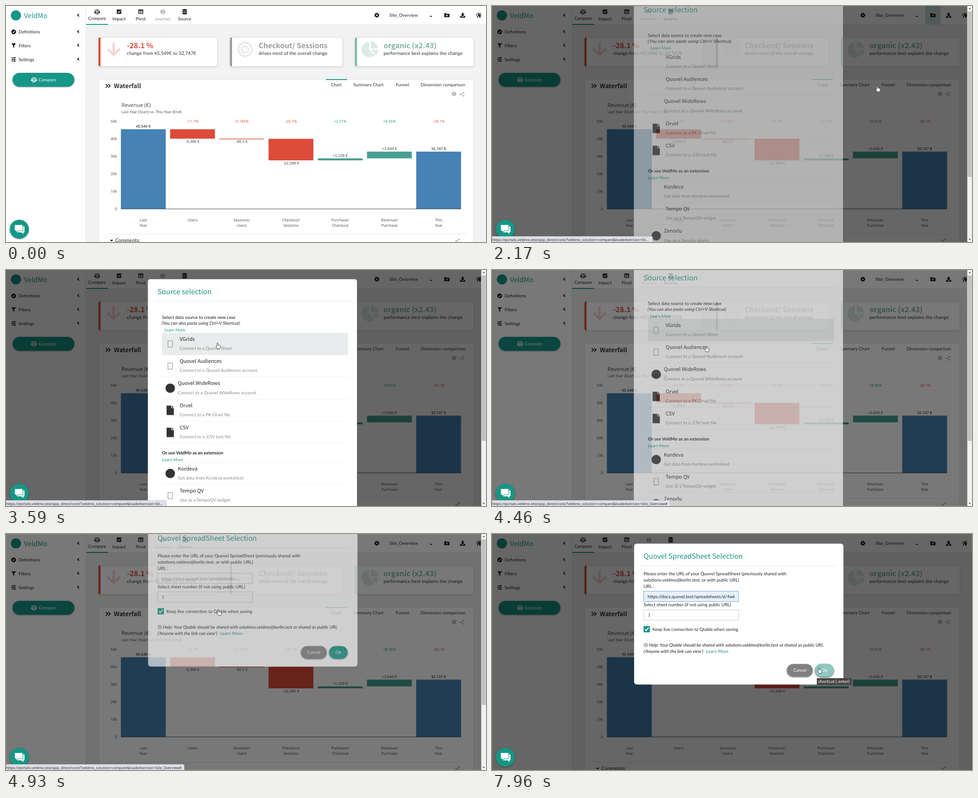
These frames come from a looping animation (1064 by 526 pixels, 8 s). An HTML page:

```html
<!DOCTYPE html>
<html lang="en">
<head>
<meta charset="utf-8">
<title>Source selection</title>
<style>
html, body { margin: 0; width: 100%; height: 100%; overflow: hidden; background: #f2f2f2; }
svg { display: block; width: 100%; height: 100%; }
text { font: 9.9px Lato, sans-serif; fill: #222; text-rendering: geometricPrecision; white-space: pre; }
.head { font-family: "Noto Sans CJK JP", "Noto Sans CJK SC", "Noto Sans CJK", sans-serif; }
.big { font-size: 16px; font-weight: 700; }
.title { font-size: 15.6px; fill: #169686; }
.row { font-size: 11.2px; }
.sub { font-size: 10.55px; fill: #333; }
.axis { font-family: "Open Sans", sans-serif; font-size: 8.4px; fill: #444; }
.value { font-family: "Liberation Sans", Arial, sans-serif; font-size: 8.5px; fill: #444; }
.url { font-family: "Open Sans", sans-serif; font-size: 8.05px; }
.teal { fill: #169686; }
.mid { text-anchor: middle; }
.end { text-anchor: end; }
.soft { fill: #8a8a8a; }
.white { fill: #fff; }
.italic { font-style: italic; font-size: 10.05px; }
.shadow { filter: drop-shadow(0 1px 1.5px #0006); }
</style>
</head>
<body>
<script>
const LOOP = 8000;
const TEAL = '#169686', RED = '#dd4b39', BLUE = '#4682b4';

const text = (x, y, str, cls = '', style = '') =>
  `<text x="${x}" y="${y}" class="${cls}" style="${style}">${str.replace(/&/g, '&amp;')}</text>`;
const rect = (x, y, w, h, fill, attrs = '') =>
  `<rect x="${x}" y="${y}" width="${w}" height="${h}" fill="${fill}" ${attrs}/>`;
const circle = (x, y, r, fill, attrs = '') => `<circle cx="${x}" cy="${y}" r="${r}" fill="${fill}" ${attrs}/>`;
const path = (d, fill = '#222', attrs = '') => `<path d="${d}" fill="${fill}" ${attrs}/>`;
const line = (d, color, width = 1) => path(d, 'none', `stroke="${color}" stroke-width="${width}"`);
const at = (x, y, body) => `<g transform="translate(${x} ${y})">${body}</g>`;
const group = (id, body) => `<g id="${id}">${body}</g>`;

const icons = {
  scales: c => line('M0-5V5M-4 5H4M-5-3.6H5', c, 1.3) + path('M-4.2-3l-2.5 5a2.6 2 0 0 0 5 0zM4.2-3l-2.5 5a2.6 2 0 0 0 5 0z', c),
  check: () => rect(-5, -5, 10, 10, '#222', 'rx="1.2"') + line('M-2.8 0l2 2.2 3.8-4.2', '#fff', 1.5),
  table: () => rect(-5.5, -5, 11, 10, '#222', 'rx="1.2"') + path('M-4-2h3.4v2.3H-4zM.6-2H4V.3H.6zM-4 1.4h3.4v2.3H-4zM.6 1.4H4v2.3H.6z', '#fff'),
  globe: () => circle(0, 0, 5.3, '#999') + line('M-5-1.8H5M-5 1.8H5M0-5V5M-1-5q-3 5 0 10M1-5q3 5 0 10', '#fff', .7),
  database: () => path('M-5-4a5 2 0 0 1 10 0V4a5 2 0 0 1-10 0z') + line('M-5-2.3q5 3 10 0M-5 1.2q5 3 10 0', '#fff', .9),
  gear: () => circle(0, 0, 3, 'none', 'stroke="#111" stroke-width="2.6"') +
    circle(0, 0, 4.7, 'none', 'stroke="#111" stroke-width="1.7" stroke-dasharray="1.9 1.79"'),
  folder: () => path('M-5.7-4.4h4l1.5 1.5h5.9v7.3H-5.7z', '#111') + line('M0-1.4V3M-2.2.8H2.2', '#fff', 1.2),
  download: () => path('M-1.6-5.5h3.2v4h2.8L0 2.8-4.4-1.5h2.8zM-5.7 2h2.9L0 4.3 2.8 2h2.9v3.6H-5.7z', '#111'),
  home: () => path('M0-5.4L6.3.2l-.8 1L0-3.6-5.5 1.2l-.8-1zM0-2.6l4.2 3.7v4.2H1.3V2h-2.6v3.3h-2.9zM3-5h1.6v3L3-3.4z', '#111'),
  chevron: () => line('M1.8-2.8L-1.3 0l3.1 2.8', '#111', 1.8),
  info: () => circle(0, 0, 5, '#b8b8b8') + line('M0-3v1.4M0-.7V3', '#fff', 1.4),
  share: () => line('M3.3-3.4L-3 0 3.3 3.4', '#bbb', 1.3) + circle(3.3, -3.4, 1.9, '#bbb') + circle(-3.2, 0, 1.9, '#bbb') + circle(3.3, 3.4, 1.9, '#bbb'),
  file: () => path('M-8-10.5H2.5V-5H8v15.5H-8zM3.7-10.5L8-6.2H3.7z', '#333'),
  blank: () => rect(-5, -7, 10, 14, 'none', 'stroke="#777" stroke-width=".9"'),
  dot: () => circle(0, 0, 10.5, '#333')
};
const icon = (name, x, y, color = '#222') => at(x, y, icons[name](color));

function sidebar() {
  const items = [['Definitions', 57.5], ['Filters', 88], ['Settings', 119]];
  return rect(0, 0, 177, 526, '#fff') + line('M177 0V526', '#e2e2e2') +
    circle(22, 21, 11.3, TEAL) + text(40, 27, 'VeldMo', 'head teal', 'font-size:15px') + icon('chevron', 160, 20.5) +
    items.map(([name, y]) => text(28, y + 3.6, name) + icon('chevron', 160, y - .5)).join('') +
    circle(17, 57.5, 5.2, '#111') + line('M14.4 57.6l2 2 3.4-3.8', '#fff', 1.4) +
    path('M11.8 83.3h10.4l-4 4.8v5.2l-2.4-1.8v-3.4z', '#111') +
    line('M12 115.4h10M12 119h10M12 122.6h10', '#111', 1.3) +
    line('M18.7 113.8v3.2M14.7 117.4v3.2M18.7 121v3.2', '#111', 1.8) +
    rect(14.5, 149, 137, 31, TEAL, 'rx="15.5" class="shadow"') + icon('scales', 62, 164, '#fff') + text(72, 168, 'Compare', 'white');
}

function header() {
  const tabs = [['Compare', 'scales', 202], ['Impact', 'check', 250.5], ['Pivot', 'table', 298.7], ['Journey', 'globe', 347.5], ['Source', 'database', 396]];
  return rect(177.5, 0, 887, 41, '#fff') + line('M177 41.5H1064', '#e3e3e3') + rect(178, 40, 48.5, 2, TEAL) +
    tabs.map(([name, glyph, x]) => icon(glyph, x, 12.7) +
      text(x, name === 'Compare' ? 31 : 32, name, 'mid', name === 'Journey' ? 'fill:#999' : '')).join('') +
    group('hoverDownload', rect(994.5, 0, 35, 42, '#c8e5e0')) + group('hoverFolder', rect(960, 0, 34.5, 42, '#c8e5e0')) +
    icon('gear', 822, 20.5) + text(850, 24.4, 'Site_Overview') + path('M939 22h6l-3 3z') +
    icon('folder', 977.3, 20.5) + icon('download', 1012.3, 20.5) + icon('home', 1047.7, 20.5);
}

function cards() {
  const card = (x, w, color, tone, tx, title, sub) =>
    rect(x, 70.5, w, 64, '#fff', 'rx="4" stroke="#e1e1e1" style="filter:drop-shadow(0 1px 2px #0002)"') +
    path(`M${x + 4} 70h-1a3.5 3.5 0 0 0-3.5 3.5v57.5a3.5 3.5 0 0 0 3.5 3.5h1z`, color) +
    text(tx, 94.3, title, 'head big', `fill:${tone}`) + text(tx, 109, sub, 'sub');
  return card(205.5, 263, RED, RED, 268, '-28.1 %', 'change from 45,549€ to 32,747€') +
    card(497, 249, '#999', '#9c9c9c', 560, 'Checkout/ Sessions', 'drives most of the overall change') +
    card(774, 263, '#7fb5a5', '#7fb5a5', 837, 'organic (x2.43)', 'performance best explains the change') +
    line('M238.5 81v27M225 95.5l13.5 13.5L252 95.5', '#f8d3ce', 4.6) +
    circle(530, 97, 15, 'none', 'stroke="#ebebeb" stroke-width="4.4"') + circle(530, 97, 7.5, 'none', 'stroke="#ebebeb" stroke-width="4"') +
    path('M805 97.5V80.5a17 17 0 1 0 12 29z', '#dcebe7') + path('M808.5 94.8V79a15.8 15.8 0 0 1 15.8 15.8zM809 97.8h16a16 16 0 0 1-4.7 11.2z', '#dcebe7');
}

function chart() {
  const zero = 452.3, tick = 39, step = 109.1;
  const bars = [['Last', 'Year', 45549, ''], ['Users', '', -5396, '-11.7%'], ['Sessions/', 'Users', -85.2, '-0.185%'],
    ['Checkout/', 'Sessions', -12298, '-26.7%'], ['Purchase/', 'Checkout', 1128, '+2.51%'],
    ['Revenue/', 'Purchase', 3849, '+8.55%'], ['This', 'Year', 32747, '-28.1%']];
  const yOf = value => zero - value * tick / 10000;
  let out = text(256, 225, 'Revenue (€)', 'axis', 'font-size:11.9px') + text(256, 239, 'Last Year (Start) vs. This Year (End)', 'axis');
  for (let k = 0; k <= 5; k++) out += text(246, yOf(k * 10000) + 3, k ? k + '0k' : '0', 'axis end');
  let level = 0;
  bars.forEach(([top, bottom, value, pct], i) => {
    const total = i === 0 || i === 6, from = total ? 0 : level;
    level = from + value;
    const x = 254.7 + i * step, mid = x + 49.7;
    const y1 = yOf(Math.max(from, level)), y2 = yOf(Math.min(from, level));
    const label = (!total && value > 0 ? '+' : '') + value.toLocaleString('en-US') + ' €';
    out += rect(x, y1, 99.4, Math.max(1.4, y2 - y1), total ? BLUE : value < 0 ? RED : '#45a092') +
      text(mid, value < 0 ? y2 + 9 : y1 - 3.6, label, 'value mid', total ? 'fill:#111' : '') +
      text(mid, 259.6, pct, 'axis mid', `fill:${pct[0] === '-' ? RED : TEAL}`) +
      text(mid, 480.3, top, 'axis mid') + text(mid, 491.7, bottom, 'axis mid');
  });
  return out + line(`M254.7 ${zero}H1008.7`, '#444');
}

function panel() {
  const tabs = [['Chart', 720], ['Summary Chart', 770], ['Funnel', 864], ['Dimension comparison', 919]];
  return rect(205.5, 163.5, 831, 400, '#fff', 'rx="4" stroke="#e1e1e1"') + rect(709, 163, 47, 2, TEAL) +
    line('M221 174l4.5 4-4.5 4M226.5 174l4.5 4-4.5 4', '#222', 1.8) +
    text(239, 183, 'Waterfall', 'head', 'font-size:13.5px;font-weight:700;fill:#333') +
    tabs.map(([name, x]) => text(x, 179, name, '', 'fill:#333')).join('') +
    icon('info', 993, 196) + icon('share', 1011, 197) + chart() +
    line('M220 508.5H1022', '#e6e6e6') + path('M230.5 521h7l-3.5 4z') + text(242, 526.3, 'Comments:', '', 'font-size:11px') + icon('share', 1001, 523.5);
}

function sourceModal() {
  const H = 49.3;
  const row = (y, x, name, desc, glyph, id = '') =>
    text(x, y + 18, name, 'head row') + text(x, y + 38.3, desc, 'soft', 'font-size:9.8px') +
    line(`M346 ${y + H}H758`, '#ededed', .8) + group(id, icon(glyph, 364, y + 25));
  const note = '(You can also paste using Ctrl+V Shortcut)';
  const y0 = 139.8, y1 = 428.6;
  return rect(314.5, 20.5, 463.5, 620, '#fff', 'rx="5"') + text(336, 54, 'Source selection', 'head title') +
    line('M328 69.5H764', '#e8e8e8') + text(346, 108.5, 'Select data source to create new case', '', 'font-weight:500') +
    group('noteFallback', text(345, 122.3, note, 'value italic', 'font-size:9.85px;fill:#111')) +
    group('note', text(345, 122.3, note, 'italic')) +
    text(351, 136.8, 'Learn More', 'teal', 'font-size:9.2px') +
    group('hoverGrid', rect(346, y0, 412, H, '#e9ecec')) + group('hoverCsv', rect(346, y0 + 4 * H, 412, H, '#f4f6f6')) +
    row(y0, 385, 'VGrids', 'Connect to a Quovel Sheet', 'blank', 'iconA') +
    row(y0 + H, 385, 'Quovel Audiences', 'Connect to a Quovel Audiences account', 'blank', 'iconB') +
    row(y0 + 2 * H, 381, 'Quovel WideRows', 'Connect to a Quovel WideRows account', 'dot', 'iconC') +
    row(y0 + 3 * H, 385, 'Orvel', 'Connect to a PK Orvel file', 'file') +
    row(y0 + 4 * H, 385, 'CSV', 'Connect to a .CSV text file', 'file') +
    text(346, 411.2, 'Or use VeldMo as an extension', '', 'font-weight:700') + text(346, 425.6, 'Learn More', 'teal', 'font-size:9.2px') +
    line(`M346 ${y1}H758`, '#ededed', .8) +
    row(y1, 381, 'Kordeva', 'Get data from Kordeva worksheet', 'dot', 'iconD') +
    row(y1 + H, 385, 'Tempo QV', 'Use as a TempoQV widget', 'blank', 'iconE') +
    row(y1 + 2 * H, 381, 'Zenorlu', 'Use as a Zenorlu plugin', 'dot');
}

const SHEET_URL = 'https://docs.quovel.test/spreadsheets/';
const SHEET_PATH = 'd/4wkr2aT6mvhQB93PUXZs5cnyGdt';

function sheetModal() {
  const button = (x, w, fill, label) => rect(x, 289.7, w, 28.8, fill, 'rx="14.4" class="shadow"') + text(x + w / 2, 307.3, label, 'white mid');
  const field = (y, fill, stroke) => rect(336, y, 210.5, 23, fill, `stroke="${stroke}"`);
  return rect(315, 21.5, 464, 314, '#fff', 'rx="6"') + text(336, 55, 'Quovel SpreadSheet Selection', 'head title') +
    line('M328 70.5H764', '#e8e8e8') +
    text(336, 92, 'Please enter the URL of your Quovel SpreadSheet (previously shared with') +
    text(336, 106.2, 'solutions.veldmo@korlin.test, or with public URL)') + text(336, 120, 'URL :') +
    field(127.5, '#fff', '#ccc') + group('placeholder', text(345, 142.6, SHEET_URL + '...', '', 'fill:#999')) +
    group('filled', rect(336, 127.5, 210.5, 23, '#e8f0fe') +
      `<svg x="336" y="127" width="202" height="24">${text(9, 15.6, SHEET_URL + SHEET_PATH)}</svg>`) +
    group('focus', field(127.5, 'none', '#6fa8d8')) + group('caret', line('M345.5 133V145', '#111')) +
    text(336, 161, 'Select sheet number (if not using public URL)') +
    field(169, '#fff', '#ccc') + text(345.5, 183.6, '1', '', 'fill:#555') +
    rect(336, 205.2, 14, 14, TEAL) + line('M338.8 212l3 3.6 5.4-7.4', '#fff', 1.9) +
    text(355.5, 216, 'Keep live connection to Qtable when saving') + icon('info', 341, 247.5) +
    text(348, 251.2, 'Help: Your Qtable should be shared with solutions.veldmo@korlin.test or shared as public URL', 'italic') +
    text(336, 265.2, "('Anyone with the link can view')", 'italic') + text(474.5, 265.2, 'Learn More', '', 'fill:#23899c') +
    button(653.5, 57.5, '#808080', 'Cancel') + button(716, 41.5, TEAL, 'Ok') + group('hoverOk', button(716, 41.5, '#90c8c0', 'Ok')) +
    group('suggest', rect(336, 151, 321, 37, '#fff', 'rx="3" class="shadow"') +
      group('hoverSuggest', rect(336, 157, 321, 25, '#ececec')) +
      text(344, 172.6, SHEET_URL + SHEET_PATH, 'url', 'font-size:8.4px;font-weight:600')) +
    group('okTip', rect(720, 321.3, 77, 15, '#444') + text(723, 332.2, 'shortcut ( enter)', 'white'));
}

function overlays() {
  const link = 'https://portals.veldmo.test/app_direct/core/?veldmo_solution=compare&loadedversion=';
  return group('folderTip', rect(897, 42.5, 97.5, 17, '#5f6b84') + text(945.7, 54.4, 'Create new use case', 'white mid', 'font-size:9.2px')) +
    group('backdrop', rect(0, 0, 1064, 526, '#000')) +
    group('scrollbar', rect(1053.5, 0, 11, 526, '#f1f1f1') + rect(1054.5, 12, 9, 369, '#c1c1c1') +
      path('M1056.5 7h5l-2.5-3zM1056.5 519h5l-2.5 3z', '#555')) +
    group('source', sourceModal()) + group('sheet', sheetModal()) +
    circle(29.5, 497.5, 21.2, TEAL, 'class="shadow"') +
    path('M24 491h15.5q1.5 0 1.5 1.5v10.5q0 1.5-1.5 1.5h-1v4l-4.5-4H24z', '#fff') +
    path('M20.5 487.5h15.5q1.5 0 1.5 1.5v10.5q0 1.5-1.5 1.5H27l-4.5 4.5V501h-2q-1.5 0-1.5-1.5V489q0-1.5 1.5-1.5z', '#fff', `stroke="${TEAL}" stroke-width="1.2"`) +
    group('status', `<rect id="statusBox" x="-4" y="513.5" width="360" height="16" rx="3" fill="#dee1e6" stroke="#b9bdc3" stroke-width=".7"/>` +
      group('statusShort', text(.5, 523.5, link + 'Sit...', 'url')) + group('statusLong', text(.5, 523.5, link + 'Site_Overview#', 'url'))) +
    group('cursor',
      group('arrow', path('M0 0V10.4l2.4-2.2 1.6 3.6 1.5-.7-1.6-3.4h3.2z', '#fff', 'stroke="#111" stroke-width=".8"')) +
      group('hand', path('M-1.2 7V.9a1.2 1.2 0 0 1 2.4 0v3.4q1-.8 1.8.2 1.1-.6 1.7.4 1.5-.3 1.5 1.2v3q0 1.6-1.2 3.4H-.2L-3.5 8.2q-.5-2 1.2-1.6z',
        '#fff', 'stroke="#111" stroke-width=".8" stroke-linejoin="round"')));
}

document.body.innerHTML = `<svg viewBox="0 0 1064 526" preserveAspectRatio="none">${
  rect(0, 0, 1064, 526, '#f2f2f2') + sidebar() + header() + cards() + panel() + overlays()}</svg>`;

const track = (id, steps, prop = 'opacity', easing = 'step-end') =>
  document.getElementById(id).animate(
    [...steps, [LOOP, steps.at(-1)[1]]].map(([t, value]) => ({ offset: t / LOOP, [prop]: value, easing })),
    { duration: LOOP, iterations: Infinity });
const show = (id, from, to = LOOP) =>
  track(id, [...(from ? [[0, 0]] : []), [from, 1], ...(to < LOOP ? [[to, 0]] : [])]);
const slide = (id, steps) =>
  track(id, steps.map(([t, dy]) => [t, `translate(0px,${dy}px)`]), 'transform');

show('hoverDownload', 850, 1080);
show('hoverFolder', 1160, 2650);
show('folderTip', 1860, 2030);
show('status', 850, 5150);
show('statusShort', 0, 3910);
show('statusLong', 3910);
track('statusBox', [[0, '360px'], [3820, '380px'], [3910, '399px']], 'width');

// The backdrop lightens a little while one dialog replaces the other.
track('backdrop', [[0, 0], [1950, .3], [2030, .6], [4460, .53], [5000, .6]]);
show('scrollbar', 2110, 5080);
track('source', [[0, 0], [2110, .5], [2190, 1], [4460, .65], [4550, .25], [4620, 0]]);
slide('source', [[0, -40], [2190, -18], [2270, -6], [2350, 0], [4460, -31], [4550, -40]]);
show('hoverCsv', 2350, 2570);
show('hoverGrid', 2570);
show('noteFallback', 0, 2720);
show('note', 2720);
show('iconA', 2650);
show('iconB', 2650);
show('iconE', 2650);
show('iconC', 2800);
show('iconD', 2800);

track('sheet', [[0, 0], [4860, .3], [4930, .65], [5000, 1]]);
slide('sheet', [[0, -50], [4930, -40], [5000, -20], [5080, -8], [5150, -2], [5220, 0]]);
show('focus', 5480);
show('suggest', 5560, 6900);
show('caret', 5660, 6160);
show('hoverSuggest', 6640);
show('filled', 6640);
show('placeholder', 0, 6640);
show('hoverOk', 7800);
show('okTip', 7880);

show('cursor', 210);
track('arrow', [[0, 1], [850, 0], [5280, 1], [7800, 0]]);
track('hand', [[0, 0], [850, 1], [5280, 0], [7800, 1]]);
track('cursor', [
  [0, 905, 385], [210, 905, 385], [450, 1020, 200], [610, 1044, 110], [850, 1018, 34], [990, 1008, 20],
  [1160, 990, 18], [1310, 990, 18], [1480, 968, 20], [1640, 973, 20], [1950, 973, 20],
  [2110, 900, 110], [2270, 780, 290], [2350, 700, 350], [2510, 657, 174], [2650, 512, 168], [2720, 512, 168],
  [3450, 392, 156], [3530, 392, 156], [3590, 469, 163], [4140, 469, 163], [4210, 473, 165], [4390, 473, 165],
  [4460, 475, 170], [4860, 475, 170], [4930, 471, 169], [5280, 471, 169], [5560, 415, 142], [5760, 405.5, 154],
  [6570, 405.5, 154], [6710, 412, 167], [7430, 412, 167], [7700, 620, 265], [7960, 725, 298]
].map(([t, x, y]) => [t, `translate(${x}px,${y}px)`]), 'transform', 'linear');
</script>
</body>
</html>
```
